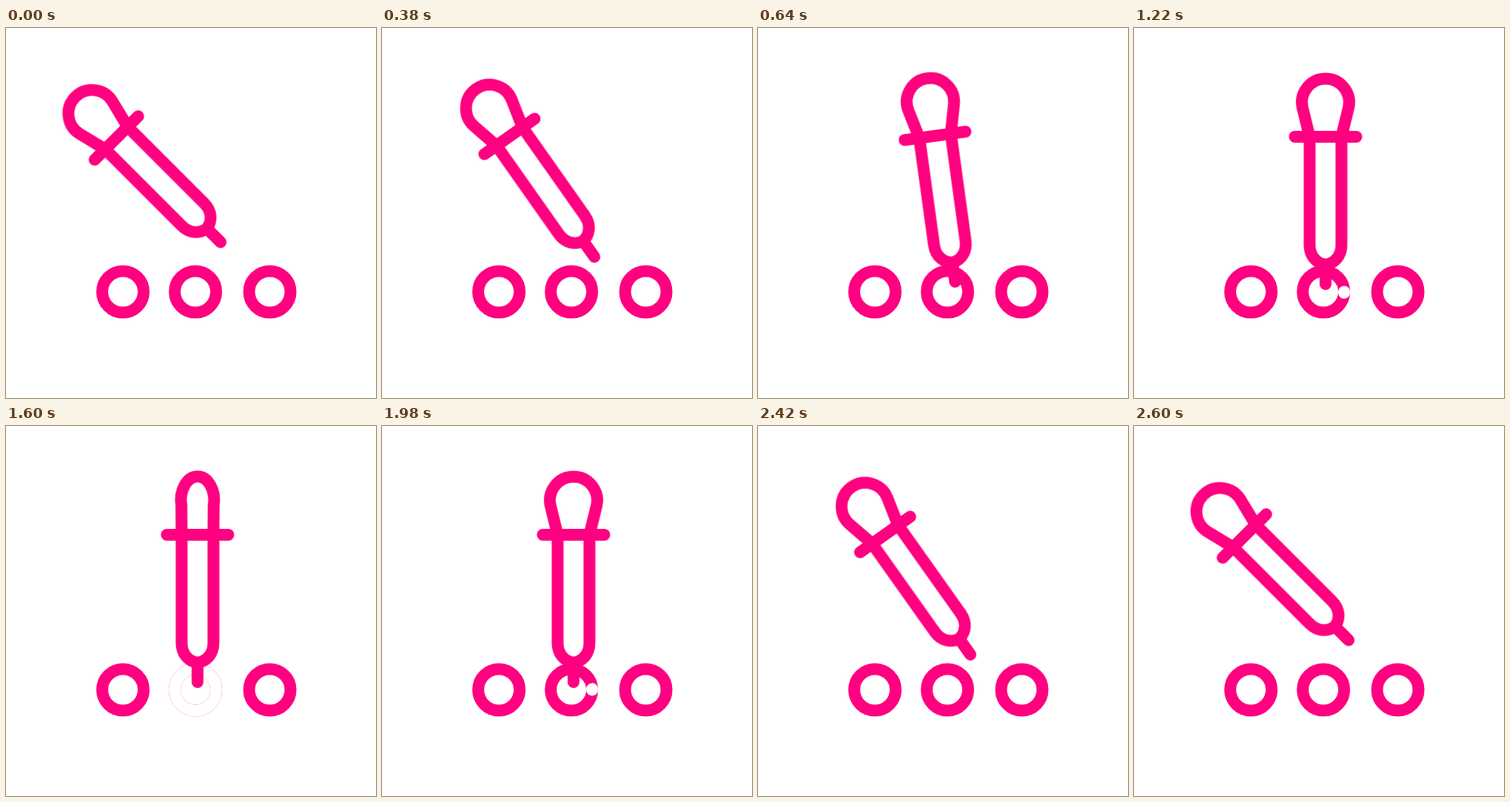
These frames come from a looping animation (500x500 px, 3.6 s). An HTML page without scripts:

```html
<!DOCTYPE html>
<html lang="en">
<head>
<meta charset="utf-8">
<title>Pipette</title>
<style>
  html, body { margin: 0; width: 100%; height: 100%; overflow: hidden; background: #fff; }
  svg {
    display: block; width: 100%; height: 100%;
    fill: none; stroke: #ff0080; stroke-width: 16;
    stroke-linecap: round; stroke-linejoin: round;
  }
  .pipette, .bulb, .wipe {
    animation: 3.6s cubic-bezier(.333, 0, .667, 1) infinite;
  }
  .pipette { animation-name: dip; }
  .bulb { animation-name: squeeze; }
  .wipe {
    stroke: #fff; stroke-dasharray: 1 2;
    animation-name: wipe, reveal;
    animation-timing-function: cubic-bezier(.333, 0, .667, 1), step-end;
  }

  @keyframes dip {
    0%, 5.5556%, 72.2222%, 100% { transform: translate(175.4px, 174.8px) rotate(-45deg); }
    22.2222%, 55.5556% { transform: translate(258.8px, 184px) rotate(0deg); }
  }
  @keyframes squeeze {
    0%, 33.3333%, 55.5556%, 100% {
      d: path("M-21.5 -37L-31.2 -76.3A32 32 0 1 1 31.2 -76.3L21.5 -37");
    }
    44.4444% {
      d: path("M-21.5 -37L-21.8 -76.3A22.4 32 0 1 1 21.8 -76.3L21.5 -37");
    }
  }
  /* The ring is erased clockwise, then drawn again the same way. */
  @keyframes wipe {
    0%, 33.3333% { stroke-dashoffset: 1; }
    44.4444% { stroke-dashoffset: 0; }
    55.5556%, 100% { stroke-dashoffset: -1; }
  }
  @keyframes reveal {
    0%, 55.5%, 100% { visibility: hidden; }
    33.5% { visibility: visible; }
  }
</style>
</head>
<body>
<svg viewBox="0 0 500 500">
  <circle cx="158" cy="356.5" r="28"/>
  <circle cx="256" cy="356.5" r="28"/>
  <circle cx="356.5" cy="356.5" r="28"/>
  <circle class="wipe" cx="256" cy="356.5" r="28" pathLength="1"/>
  <g class="pipette">
    <path class="bulb" d="M-21.5 -37L-31.2 -76.3A32 32 0 1 1 31.2 -76.3L21.5 -37"/>
    <path d="M-41.5 -37H41.5"/>
    <path d="M-21.5 -37V109C-21.5 125 -11.5 134 0 136C11.5 134 21.5 125 21.5 109V-37"/>
    <path d="M0 136V162"/>
  </g>
</svg>
</body>
</html>
```
